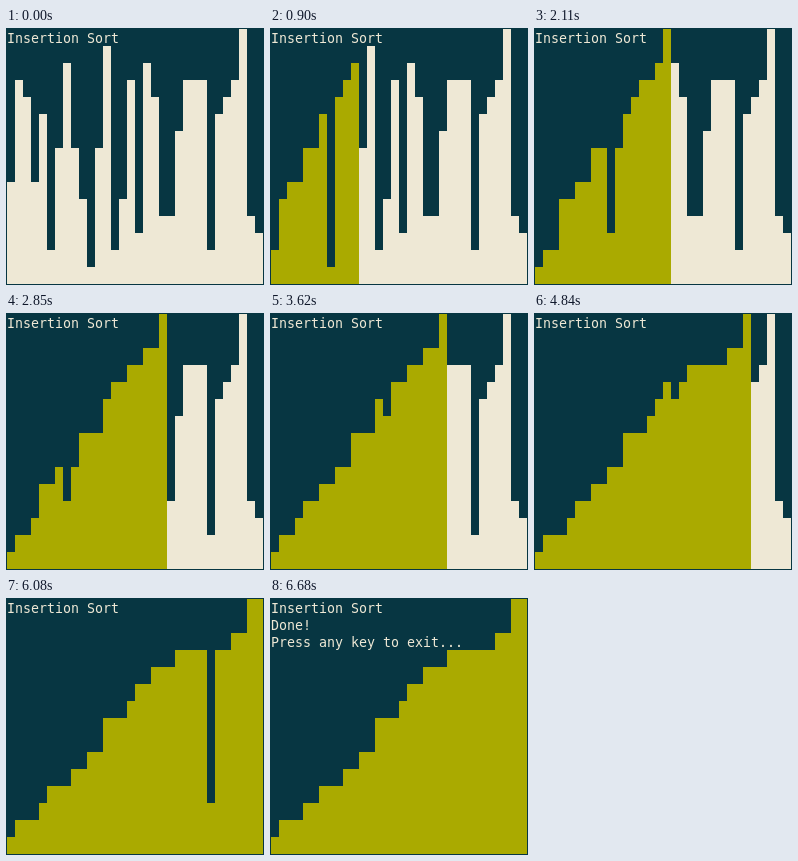
An HTML page that plays this animation: 258 by 257 pixels, repeating every 6720 ms.

```html
<!DOCTYPE html>
<html lang="en">
<head>
<meta charset="utf-8">
<title>Insertion Sort</title>
<style>
  html, body { margin: 0; width: 100%; height: 100%; overflow: hidden; background: #073642; }
  svg { display: block; }
  text { font: 13.29px "DejaVu Sans Mono", monospace; fill: #eee8d5; }
</style>
</head>
<body>
<svg width="258" height="257" viewBox="0 0 258 257">
  <g id="bars" shape-rendering="crispEdges"></g>
  <rect x="1" y="1" width="112" height="17" fill="#073642"/>
  <text x="1" y="15">Insertion Sort</text>
  <g id="done" visibility="hidden">
    <text x="1" y="32">Done!</text>
    <text x="1" y="49">Press any key to exit...</text>
  </g>
</svg>
<script>
const CELL_W = 8, CELL_H = 17, FLOOR = 256;
const PLAIN = '#eee8d5', SORTED = '#aaaa00';
const LOOP = 6720, TICK = 40, BATCH = 17;
const batchStarts = [40, 730, 1420, 2110, 2810, 3500, 4190, 4880, 5560, 6240];
const values = [
  6, 12, 11, 6, 10, 2, 8, 13, 8, 5, 1, 8, 15, 2, 5, 12,
  3, 13, 11, 4, 4, 9, 12, 12, 12, 2, 10, 11, 12, 15, 4, 3
];

// One state per swap: the heights and how many columns are highlighted.
function sortStates(input) {
  const a = [...input];
  const states = [{ heights: [...a], lit: 0 }];
  for (let i = 1; i < a.length; i++) {
    for (let j = i; j > 0 && a[j - 1] > a[j]; j--) {
      [a[j - 1], a[j]] = [a[j], a[j - 1]];
      states.push({ heights: [...a], lit: i + 1 });
    }
  }
  return states;
}

const states = sortStates(values);
const last = states.length - 1;
const done = document.getElementById('done');
const bars = values.map((_, i) => {
  const bar = document.createElementNS('http://www.w3.org/2000/svg', 'rect');
  bar.setAttribute('x', 1 + i * CELL_W);
  bar.setAttribute('width', CELL_W);
  return document.getElementById('bars').appendChild(bar);
});

function tickAt(t) {
  const batch = batchStarts.findLastIndex(s => s <= t);
  if (batch < 0) return 0;
  const inBatch = Math.floor((t - batchStarts[batch]) / TICK);
  return 1 + batch * BATCH + Math.min(BATCH - 1, inBatch);
}

// Swaps run a little faster than the display ticks.
function swapsAt(tick) {
  if (tick === 0) return 0;
  return Math.min(last, Math.max(1, Math.floor(1.345 * tick - 0.85)));
}

let shown = -1;
function draw(t) {
  const step = swapsAt(tickAt(t));
  if (step === shown) return;
  shown = step;
  const { heights, lit } = states[step];
  bars.forEach((bar, i) => {
    const h = heights[i] * CELL_H;
    bar.setAttribute('y', FLOOR - h);
    bar.setAttribute('height', h);
    bar.setAttribute('fill', i < lit ? SORTED : PLAIN);
  });
  done.setAttribute('visibility', step === last ? 'visible' : 'hidden');
}

const start = performance.now();
function run() {
  draw((performance.now() - start) % LOOP);
  requestAnimationFrame(run);
}
run();
</script>
</body>
</html>
```
